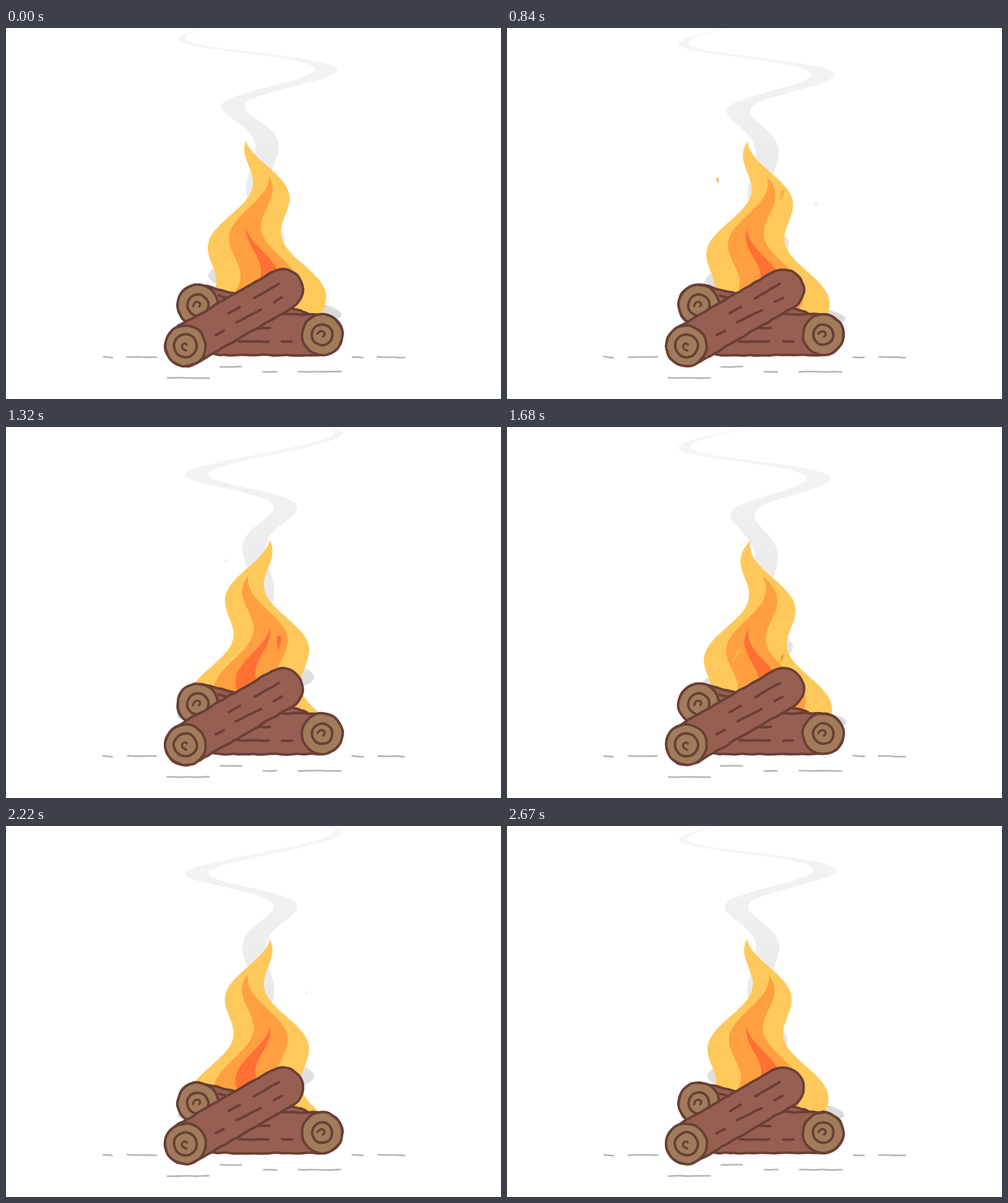
An HTML page with a canvas that plays this animation: 800 by 600 pixels, repeating every 2700 ms.

```html
<!DOCTYPE html>
<html lang="en">
<head>
<meta charset="utf-8">
<title>Campfire</title>
<style>
  html, body { margin: 0; width: 100%; height: 100%; overflow: hidden; background: #fff; }
  canvas { display: block; }
</style>
</head>
<body>
<canvas id="stage" width="800" height="600"></canvas>
<script>
const ctx = document.getElementById('stage').getContext('2d');
const LOOP = 2700, WAVE = 900, BOIL = 90, TAU = Math.PI * 2;
const BARK = '#965f51', RIM = '#693f36', WOOD = '#a27b5b', GROUND = '#b4b4b4';
const AMBER = '#f9b54f', ORANGE = '#ffae4a', RED = '#ff7034';

const smokeFill = ctx.createLinearGradient(0, 0, 0, 480);
smokeFill.addColorStop(0, '#f7f5f5');
smokeFill.addColorStop(0.4, '#eeedee');
smokeFill.addColorStop(0.6, '#e9e8e9');
smokeFill.addColorStop(1, '#d9d9da');

// tip height, wave origin, half width per pixel of height, colour
const flames = [
  [183, 183, 0.37, '#fec95a'],
  [240, 171, 0.285, '#ff9f40'],
  [325, 160, 0.2, '#ff7034']
];

// start, life, from x, from y, to x, to y, colour
const sparks = [
  [0, 600, 375, 400, 345, 140, AMBER],
  [240, 600, 395, 400, 359, 192, RED],
  [360, 600, 390, 436, 336, 229, AMBER],
  [240, 640, 402, 356, 500, 284, ORANGE],
  [540, 600, 405, 400, 464, 202, ORANGE],
  [860, 480, 385, 400, 355, 215, AMBER],
  [1170, 480, 436, 400, 446, 284, RED],
  [1600, 640, 434, 399, 486, 269, '#f59b38'],
  [1560, 560, 354, 395, 407, 312, ORANGE]
];

const groundDashes = [
  [157, 532, 172, 533], [196, 532, 243, 532], [560, 532, 577, 533], [601, 532, 644, 533],
  [346, 548, 380, 548], [416, 556, 437, 556], [473, 556, 541, 556], [261, 566, 328, 566]
];

let seed = 0;
function jitter(amount) {
  const n = Math.sin(++seed * 12.9898) * 43758.5453;
  return (n - Math.floor(n) - 0.5) * 2 * amount;
}

function fillShape(points, fill) {
  ctx.beginPath();
  points.forEach(p => ctx.lineTo(p[0], p[1]));
  ctx.fillStyle = fill;
  ctx.fill();
}

// Smooth hand-drawn outline through slightly shaken points
function sketch(points, { fill, closed = true, color = RIM, width = 4, shake = 1 }) {
  const pts = points.map(([x, y]) => [x + jitter(shake), y + jitter(shake)]);
  const mid = (a, b) => [(a[0] + b[0]) / 2, (a[1] + b[1]) / 2];
  const last = pts.length - 1;
  ctx.beginPath();
  ctx.moveTo(...(closed ? mid(pts[last], pts[0]) : pts[0]));
  for (let i = closed ? 0 : 1; i < (closed ? pts.length : last); i++)
    ctx.quadraticCurveTo(...pts[i], ...mid(pts[i], pts[(i + 1) % pts.length]));
  if (closed) ctx.closePath(); else ctx.lineTo(...pts[last]);
  if (fill) { ctx.fillStyle = fill; ctx.fill(); }
  ctx.strokeStyle = color;
  ctx.lineWidth = width;
  ctx.lineCap = ctx.lineJoin = 'round';
  ctx.stroke();
}

function segment(x1, y1, x2, y2, gap = 8) {
  const n = Math.max(2, Math.round(Math.hypot(x2 - x1, y2 - y1) / gap));
  return Array.from({ length: n + 1 }, (_, i) => [x1 + (x2 - x1) * i / n, y1 + (y2 - y1) * i / n]);
}

function arc(x, y, r, from, to, rEnd = r) {
  const n = Math.max(6, Math.round(r * Math.abs(to - from) / 8));
  return Array.from({ length: n }, (_, i) => {
    const k = i / n, a = from + (to - from) * k, d = r + (rEnd - r) * k;
    return [x + d * Math.cos(a), y + d * Math.sin(a)];
  });
}

function dash(coords, color = RIM, width = 4) {
  sketch(segment(...coords), { closed: false, color, width, shake: 0.6 });
}

function log(x1, y1, x2, y2, ring, spin, dashes) {
  const r = 33, a = Math.atan2(y2 - y1, x2 - x1), q = Math.PI / 2;
  const nx = r * Math.cos(a + q), ny = r * Math.sin(a + q);
  sketch([
    ...arc(x1, y1, r, a + q, a + 3 * q),
    ...segment(x1 - nx, y1 - ny, x2 - nx, y2 - ny),
    ...arc(x2, y2, r, a - q, a + q),
    ...segment(x2 + nx, y2 + ny, x1 + nx, y1 + ny)
  ], { fill: BARK });
  dashes.forEach(d => dash(d));
  sketch(arc(x1, y1, r, 0, TAU), { fill: WOOD });
  sketch(arc(x1, y1, ring, 0, TAU), { shake: 0.7 });
  sketch(arc(x1, y1, 8, spin, spin + 5, 2), { closed: false, width: 3.5, shake: 0.3 });
}

function drawSmoke(t) {
  const left = [], right = [];
  for (let y = -45; y <= 490; y++) {
    const low = Math.max(0, Math.min(y, 470) - 310);
    const sway = 6 + 124 / (1 + Math.exp((y - 108) / 28)) + 0.57 * low;
    const half = y < 190 ? Math.max(2, Math.min(19, 5 + y * 0.2))
      : 19 - (Math.min(y, 310) - 190) * 0.04 + 0.16 * low;
    const wave = Math.cos(TAU * ((y - 70) / 130 + t / WAVE));
    const x = 411 + sway * wave;
    const sag = (1 - wave) * 0.05 * Math.max(0, 130 - y);
    left.push([x - half, y + sag]);
    right.unshift([x + half, y + sag]);
  }
  fillShape([...left, ...right], smokeFill);
}

function drawFlame(t, [tip, origin, spread, color]) {
  const left = [], right = [];
  for (let y = tip; y <= 468; y += 3) {
    const x = 407 - 19.5 * Math.cos(TAU * ((y - origin) / 160 + t / WAVE));
    const half = spread * (y - tip);
    left.push([x - half, y]);
    right.unshift([x + half, y]);
  }
  fillShape([...left, ...right], color);
}

function drawSpark(t, [start, life, x0, y0, x1, y1, color]) {
  const p = (t - start) / life;
  if (p <= 0 || p >= 1) return;
  const e = 1 - (1 - p) ** 1.5;
  const size = 32 * (1 - p) ** 0.65 * Math.min(1, p * 4);
  const w = size * 0.15;
  ctx.save();
  ctx.translate(x0 + (x1 - x0) * e, y0 + (y1 - y0) * e);
  ctx.rotate(Math.atan2(x1 - x0, y0 - y1));
  ctx.beginPath();
  ctx.moveTo(0, size / 2);
  ctx.quadraticCurveTo(-w * 0.6, 0, -w, -size / 2 + w);
  ctx.quadraticCurveTo(-w, -size / 2, 0, -size / 2);
  ctx.quadraticCurveTo(w, -size / 2, w, -size / 2 + w);
  ctx.quadraticCurveTo(w * 1.2, 0, 0, size / 2);
  ctx.fillStyle = color;
  ctx.fill();
  ctx.restore();
}

function draw(now) {
  const t = now % LOOP;
  seed = Math.floor(t / BOIL) * 1009;
  ctx.fillStyle = '#fff';
  ctx.fillRect(0, 0, 800, 600);

  drawSmoke(t);
  flames.forEach(f => drawFlame(t, f));
  sparks.forEach(s => drawSpark(t, s));

  groundDashes.forEach(d => dash(d, GROUND, 2.6));
  log(310, 448, 470, 490, 17.5, 2.9, [[344, 433, 356, 436]]);
  log(511, 496, 345, 496, 17, 3.3, [[376, 507, 424, 507], [446, 507, 462, 507], [404, 485, 426, 485]]);
  log(290, 514, 447, 423, 19, 1.4, [
    [360, 461, 378, 451], [401, 437, 441, 414], [433, 443, 446, 436],
    [372, 476, 412, 456], [339, 497, 352, 490]
  ]);
  requestAnimationFrame(draw);
}
requestAnimationFrame(draw);
</script>
</body>
</html>
```
